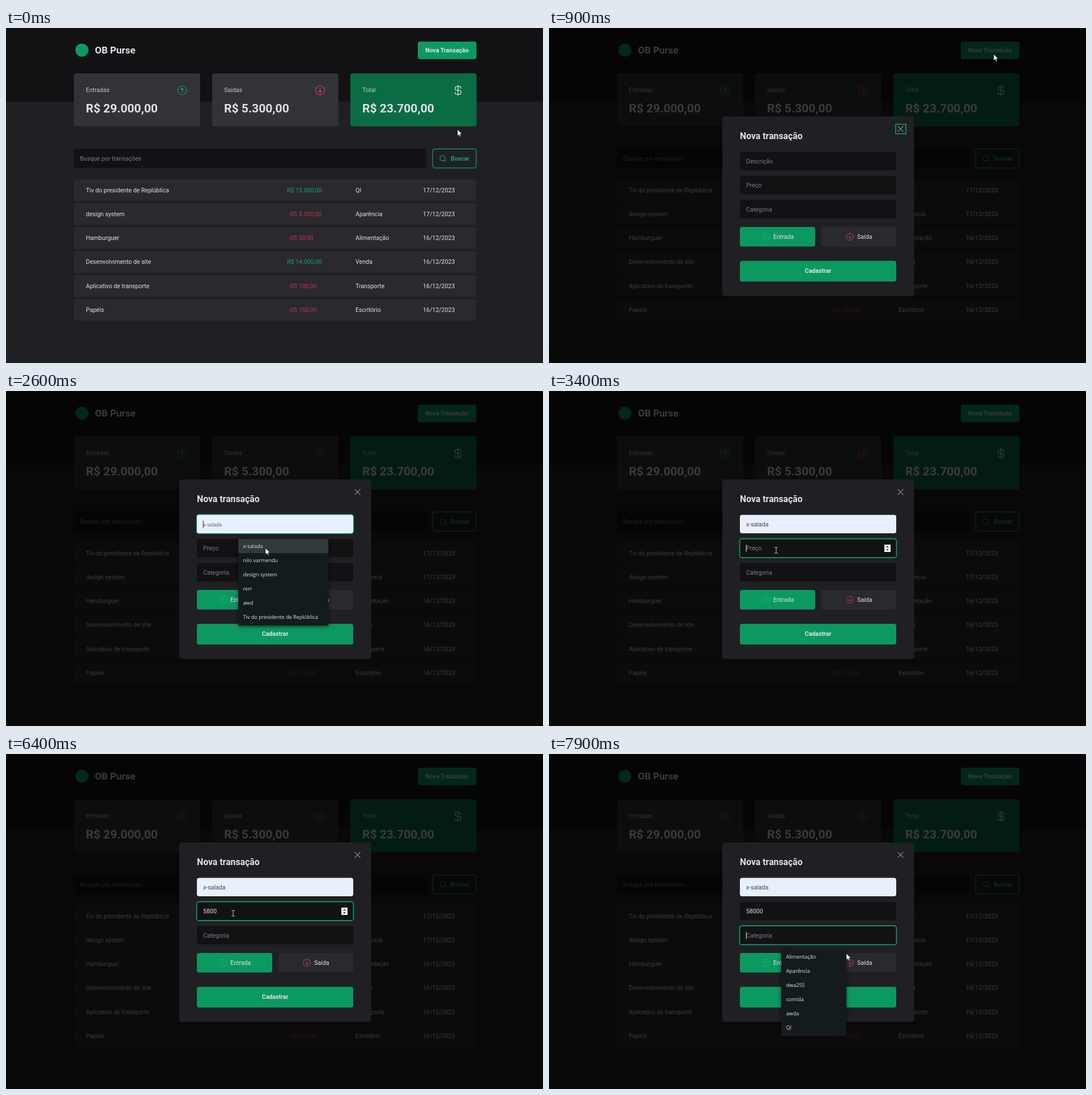
An HTML page for the animation above (8000 ms loop, 948x591 px).

```html
<!DOCTYPE html>
<html lang="pt-BR">
<head>
<meta charset="utf-8">
<title>Transações</title>
<style>
html, body { margin: 0; width: 100%; height: 100%; overflow: hidden; background: #202024; }
svg { display: block; font: 10.6px Roboto, Arial, sans-serif; fill: #e1e1e6; }
.bold { font-weight: 700; }
.sum { font-size: 21.1px; font-weight: 700; }
.title { font-size: 15.8px; font-weight: 700; }
.brand { font-size: 17px; font-weight: 700; }
.hint { fill: #7c7c8a; }
.label { fill: #c4c4cc; }
.in { fill: #10a56c; }
.out { fill: #c4324d; }
.well { fill: #121214; }
.card { fill: #323238; }
.soft { fill: #29292e; }
.green { fill: #0c9961; }
.dark { fill: #0a6c43; }
.light { fill: #e8f0fe; }
.ink { fill: #44444e; }
.line { fill: none; stroke: #0f9f66; stroke-width: 1.2; stroke-linecap: round; stroke-linejoin: round; }
.ring { stroke-width: 1.6; }
.red { stroke: #cf4053; }
.white { stroke: #f0f0f2; }
.grey { stroke: #8d8d99; }
.menu { font: 9.1px "Open Sans", "Noto Sans", sans-serif; fill: #dfe4e5; }
.menu .box { fill: #141b1d; filter: drop-shadow(0 2px 3px #0009); }
.menu .hot { fill: #32393b; }
.preview { font: 8.6px "Open Sans", "Noto Sans", sans-serif; fill: #55555f; }
[data-on] { animation: 8s step-end infinite; }

#mouse { animation: move 8s linear infinite; }
@keyframes move {
  0%, 1.25% { transform: translate(797px, 179px); }
  3.75% { transform: translate(803px, 142px); }
  6.25% { transform: translate(804px, 78px); }
  8.75% { transform: translate(800px, 42px); }
  10%, 11.24% { transform: translate(799px, 36px); }
  11.25%, 12.4% { transform: translate(785px, 46px); }
  15% { transform: translate(655px, 130px); }
  17.5% { transform: translate(510px, 215px); }
  20%, 25% { transform: translate(452px, 236px); }
  27.5% { transform: translate(455px, 262px); }
  30%, 36.25% { transform: translate(458px, 277px); }
  38.75% { transform: translate(430px, 280px); }
  41.25%, 86.25% { transform: translate(401px, 281px); }
  90% { transform: translate(412px, 310px); }
  92.5%, 96.25% { transform: translate(421px, 331px); }
  97.5% { transform: translate(472px, 341px); }
  98.75%, 100% { transform: translate(525px, 352px); }
}
#new { animation: hover 8s linear infinite; }
@keyframes hover {
  0%, 7.5% { fill: #0c9961; }
  10%, 11.24% { fill: #0a6c43; }
  11.25%, 100% { fill: #0c9961; }
}
</style>
</head>
<body>
<svg width="948" height="591" viewBox="0 0 948 591">
  <defs>
    <g id="up"><circle r="8"/><path d="M0 4V-4M-3.2-.8 0-4 3.2-.8"/></g>
    <g id="down"><circle r="8"/><path d="M0-4V4M-3.2.8 0 4 3.2.8"/></g>
  </defs>

  <rect class="well" width="948" height="130"/>
  <circle class="green" cx="134" cy="39" r="11.5"/>
  <text class="brand" x="157" y="45">OB Purse</text>
  <rect id="new" x="727" y="24" width="103.5" height="31" rx="4"/>
  <text class="bold" x="778.5" y="43.3" text-anchor="middle">Nova Transação</text>

  <g id="cards"></g>
  <use class="line" href="#up" x="311" y="110" stroke-width="1.4"/>
  <use class="line red" href="#down" x="554.5" y="110"/>
  <path class="line white" d="M798 101V119M803 106.5a3.5 3.5 0 0 0-3.5-3.5h-3a3.4 3.4 0 0 0 0 7h3.5a3.5 3.5 0 0 1 0 7h-4a3.5 3.5 0 0 1-3.5-3.5"/>

  <rect class="well" x="120" y="213" width="622.5" height="34" rx="4"/>
  <text class="hint" x="130.5" y="233.8">Busque por transações</text>
  <rect class="line" x="753.3" y="213.3" width="76.8" height="33.6" rx="4"/>
  <path class="line" d="M774.2 233.2l2.6 2.6M775.4 229.7a4.6 4.6 0 1 1-9.2 0 4.6 4.6 0 0 1 9.2 0"/>
  <text class="bold in" x="785" y="233.8">Buscar</text>

  <g id="rows"></g>

  <g data-on="900 8000">
    <rect width="948" height="591" fill="#000" opacity=".74"/>
    <rect x="306" y="156" width="338.5" height="316.5" rx="4" fill="#202024"/>
    <text class="title" x="337" y="196">Nova transação</text>
    <path class="line grey" d="M616 173.4l9.2 9.2M625.2 173.4l-9.2 9.2"/>
    <rect class="line ring" data-on="900 1500" x="612" y="169.8" width="18" height="17"/>

    <g id="fields"></g>
    <rect class="light" data-on="2200 8000" x="337" y="218.5" width="276" height="32.5" rx="4"/>
    <text class="hint" data-on="900 2200" x="348" y="238.8">Descrição</text>
    <text class="preview" data-on="2200 2900" x="348" y="238.6">x-salada</text>
    <text class="ink" data-on="2900 8000" x="348" y="238.8">x-salada</text>
    <text class="hint" data-on="900 4600" x="348" y="281.2">Preço</text>
    <text id="price" x="348" y="281.2"></text>
    <g data-on="2900 7200">
      <rect x="592" y="271" width="11" height="13" fill="#f1f1f1"/>
      <path d="M595.2 276l2.3-2.8 2.3 2.8zM595.2 279l2.3 2.8 2.3-2.8z" fill="#333"/>
    </g>
    <text class="hint" x="348" y="323.5">Categoria</text>

    <rect class="green" x="337" y="351" width="133" height="34.5" rx="4"/>
    <use class="line" href="#up" style="stroke:#13b57d" transform="translate(383 368.3) scale(.78)"/>
    <text x="396" y="372">Entrada</text>
    <rect class="soft" x="480.3" y="351" width="132.7" height="34.5" rx="4"/>
    <use class="line red" href="#down" transform="translate(531 368.3) scale(.78)"/>
    <text x="544" y="372">Saída</text>
    <rect class="green" x="337" y="410.7" width="276" height="36.6" rx="4"/>
    <text class="bold" x="475" y="432.3" text-anchor="middle">Cadastrar</text>

    <g id="carets"></g>
    <g id="menus"></g>
  </g>

  <g id="mouse">
    <path data-on="0 1600,2150 2900,7750 8000" fill="#fff" stroke="#111" stroke-width=".7"
      d="M0 0V11.5L2.6 9 4.4 13 6.2 12.2 4.5 8.3H8Z"/>
    <path class="line" data-on="1600 2150,2900 7750" style="stroke:#c9c9ce;stroke-width:1"
      d="M-2.6-5H-.8L0-4.4.8-5H2.6M0-4.4V4.4M-2.6 5H-.8L0 4.4.8 5H2.6"/>
  </g>
</svg>

<script>
const LOOP = 8000;
const fill = (id, items, draw) => {
  document.getElementById(id).innerHTML = items.map(draw).join('');
};
const text = (x, y, s, cls = '') => `<text class="${cls}" x="${x}" y="${y}">${s}</text>`;
const box = (x, y, w, h, cls, extra = '') =>
  `<rect class="${cls}" x="${x}" y="${y}" width="${w}" height="${h}" rx="4" ${extra}/>`;

fill('cards', [
  ['Entradas', '29.000', 'card'], ['Saídas', '5.300', 'card'], ['Total', '23.700', 'dark']
], ([name, sum, cls], i) => {
  const x = 120 + i * 244;
  return box(x, 80, 222.7, 93.6, cls) + text(x + 21, 113, name, 'label')
    + text(x + 21, 149, `R$ ${sum},00`, 'sum');
});

fill('rows', [
  ['Tiv do presidente de Replública', 'R$ 15.000,00', 'QI', 17],
  ['design system', '- R$ 5.000,00', 'Aparência', 17],
  ['Hamburguer', '- R$ 50,00', 'Alimentação', 16],
  ['Desenvolvimento de site', 'R$ 14.000,00', 'Venda', 16],
  ['Aplicativo de transporte', '- R$ 100,00', 'Transporte', 16],
  ['Papéis', '- R$ 150,00', 'Escritório', 16]
], ([name, sum, kind, day], i) => {
  const y = 267 + i * 42.25, base = y + 22.6;
  return box(120, y, 710.5, 38.3, 'soft') + text(141, base, name)
    + text(496, base, sum, sum[0] === '-' ? 'out' : 'in')
    + text(617, base, kind) + text(736, base, day + '/12/2023');
});

// Field backgrounds with their focus rings
fill('fields', [[218.5, '1500 3400'], [261, '3400 7400'], [303.5, '7400 8000']], ([y, on]) =>
  box(337, y, 276, 32.5, 'well') + box(336.6, y - .4, 276.8, 33.3, 'line ring', `data-on="${on}"`));

// Digits of the price and the time each is typed
fill('price', [[5, 4600], [8, 5000], [0, 5100], [0, 5600], [0, 6600]], ([digit, at]) =>
  `<tspan data-on="${at} ${LOOP}">${digit}</tspan>`);

fill('carets', [
  [348, 235, '1500 2100', '#ddd'], [348, 235, '2600 2900', '#222'], [388, 235, '2900 3400', '#222'],
  [348, 277.5, '3400 3900'], [354, 277.5, '4600 5000'], [360, 277.5, '5000 5100'],
  [366, 277.5, '5100 5600'], [372, 277.5, '5600 6000'], [378, 277.5, '6600 7400'],
  [348, 320, '7400 8000']
], ([x, y, on, color = '#ddd']) =>
  `<rect data-on="${on}" x="${x - .3}" y="${y - 6.3}" width="1" height="12.6" fill="${color}"/>`);

fill('menus', [
  [261, 159, '1600 2900', ['x-salada', 'nilo varmendu', 'design system', 'rerr', 'awd',
    'Tiv do presidente de Replública'], '2200 2900'],
  [345.5, 115, '7600 8000', ['Alimentação', 'Aparência', 'dwa255', 'comida', 'awda', 'QI']]
], ([y, w, on, items, hot]) => `<g class="menu" data-on="${on}">`
  + `<path class="box" d="M416 ${y}l5-4 5 4h${w - 16}v152.5h-${w}v-152.5z"/>`
  + (hot ? `<rect class="hot" data-on="${hot}" x="410" y="${y}" width="${w}" height="25"/>` : '')
  + items.map((s, i) => text(418.5, y + 15.8 + i * 25, s)).join('') + '</g>');

// Turn each data-on list of "from to" spans into visibility keyframes
const rules = [];
document.querySelectorAll('[data-on]').forEach((el, i) => {
  const key = (t, v) => `${t / LOOP * 100}%{visibility:${v}}`;
  const spans = el.dataset.on.split(',').map(s => s.split(' ').map(Number));
  const keys = spans[0][0] > 0 ? [key(0, 'hidden')] : [];
  for (const [from, to] of spans) {
    keys.push(key(from, 'visible'), key(to, to < LOOP ? 'hidden' : 'visible'));
  }
  if (spans.at(-1)[1] < LOOP) keys.push(key(LOOP, 'hidden'));
  rules.push(`@keyframes on${i}{${keys.join('')}}`);
  el.style.animationName = 'on' + i;
});
const sheet = document.createElement('style');
sheet.textContent = rules.join('\n');
document.head.append(sheet);
</script>
</body>
</html>
```
